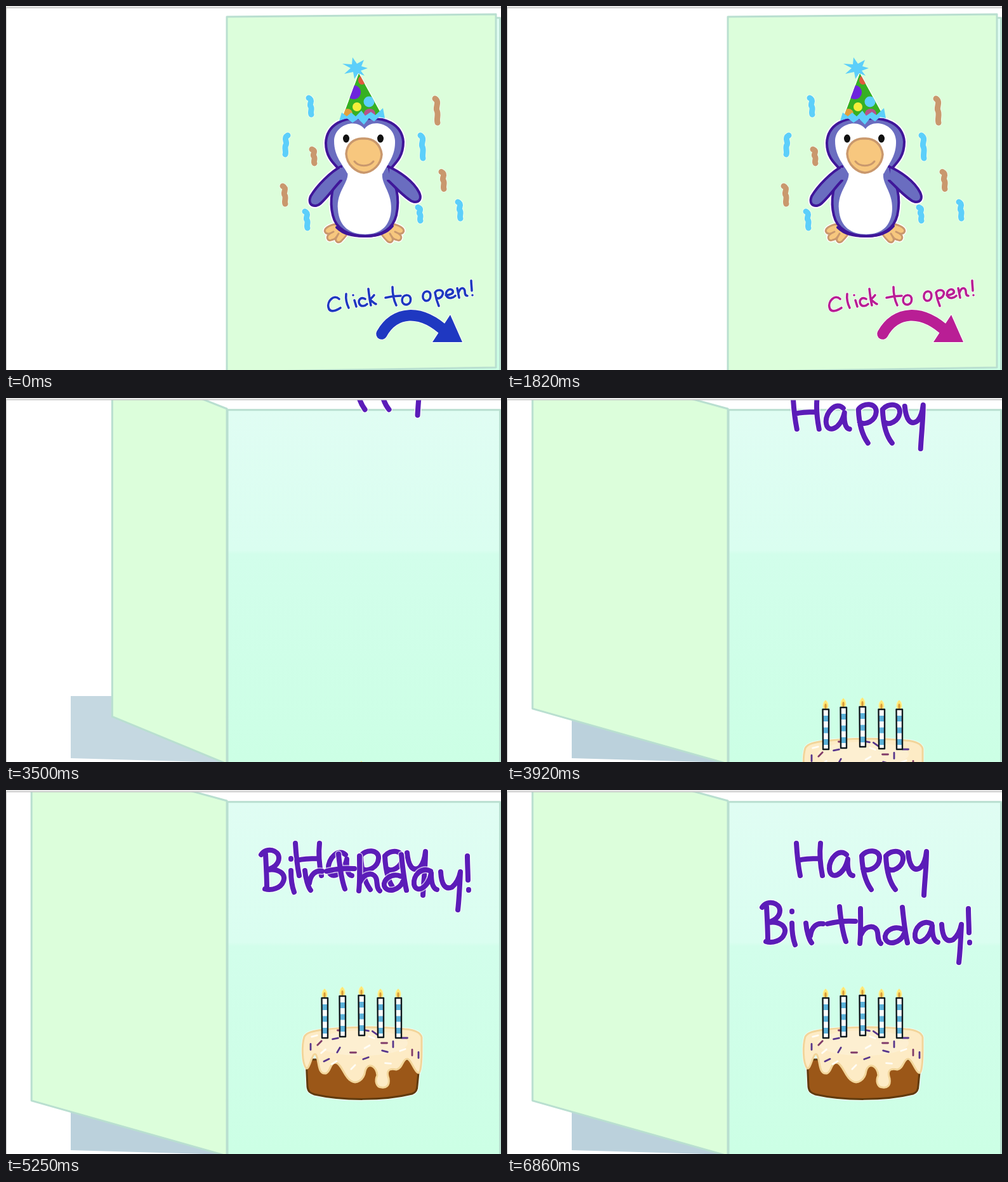
An HTML page with a canvas that plays this animation: 780x574 px, repeating every 6.93 s.

```html
<!DOCTYPE html>
<html lang="en">
<head>
<meta charset="utf-8">
<title>Birthday card</title>
<style>
html, body { margin: 0; width: 780px; height: 574px; overflow: hidden; background: #fff; }
canvas { display: block; }
</style>
</head>
<body>
<canvas id="stage" width="780" height="574" role="img" aria-label="Click to open! Happy Birthday!"></canvas>
<script>
const ctx = document.getElementById('stage').getContext('2d');
const LOOP = 6930, STEP = 70, HINGE = 348;
const SKY = '#5ccffa', TAN = '#c9986d', EDGE = '#b9dfd0', INK = '#3f1699', FUR = '#6a6dc0';
ctx.lineCap = ctx.lineJoin = 'round';

const clamp = v => Math.max(0, Math.min(1, v));
const part = (t, from, to) => clamp((t - from) / (to - from));
const smooth = p => p * p * (3 - 2 * p);

function shape(d, fill, stroke, width = 3) {
  const path = new Path2D(d);
  if (fill) { ctx.fillStyle = fill; ctx.fill(path); }
  if (stroke) { ctx.strokeStyle = stroke; ctx.lineWidth = width; ctx.stroke(path); }
}
function oval(x, y, rx, ry, fill) {
  ctx.beginPath();
  ctx.ellipse(x, y, rx, ry, 0, 0, 7);
  ctx.fillStyle = fill;
  ctx.fill();
}
function polygon(points, fill, stroke, width = 3) {
  shape('M' + points.join('L') + 'Z', fill, stroke, width);
}
function at(x, y, draw) {
  ctx.save();
  ctx.translate(x, y);
  draw();
  ctx.restore();
}

// Hand lettering, one path per letter
const PROMPT = [
  'M525 462C516 454 506 466 508 475C510 485 521 480 527 476',
  'M536 454C535 462 537 470 540 476', 'M549 464L552 474M547 456L547 456',
  'M566 462C559 458 554 464 557 470C560 475 566 473 569 470',
  'M571 446C572 455 573 464 575 472M580 456C577 460 574 462 573 463C577 465 580 469 583 470',
  'M609 443C609 454 611 464 615 472M598 460C606 458 614 457 622 457',
  'M631 456C622 457 622 470 630 471C640 471 640 455 631 456',
  'M663 450C655 451 655 464 662 465C671 465 671 449 663 450',
  'M682 473C679 466 677 458 676 452C680 445 691 448 688 455C686 461 681 462 678 460',
  'M693 456C700 456 706 453 704 449C700 443 691 450 694 457C697 463 705 460 708 457',
  'M711 445C712 450 713 455 714 460M713 452C717 441 723 445 723 450C723 454 724 457 727 457',
  'M733 433C733 439 734 445 734 449M735 456L735 456'
].join('');
const HAPPY = [
  'M456 84C457 102 459 120 462 135M459 111C470 108 482 108 493 108M494 84C492 102 494 120 497 135',
  'M535 102C524 91 507 108 508 124C509 143 531 136 537 109C536 122 538 134 545 135',
  'M574 157C566 146 560 128 559 104C566 93 588 93 587 108C586 122 570 130 561 124',
  'M612 157C603 146 598 128 597 104C606 93 626 94 624 110C622 122 608 130 600 124',
  'M632 99C634 120 641 130 652 122C658 116 660 106 661 97C661 120 658 145 657 166'
].join('');
const BIRTHDAY = [
  'M409 184C410 204 411 222 411 238M402 185C411 172 430 178 430 190C430 203 416 207 412 209C430 206 442 216 437 227C433 238 418 242 408 239',
  'M449 210C449 222 451 236 454 244M449 191L449 192',
  'M471 210C472 222 476 236 480 241M478 230C480 216 488 209 498 211',
  'M524 184C526 205 529 225 534 239M505 211C520 207 535 206 549 207',
  'M557 187C557 205 558 225 556 242M558 228C565 212 582 212 584 225C585 234 585 239 589 242',
  'M622 219C608 213 594 224 596 234C600 246 620 242 626 226M623 185C625 205 628 228 631 241',
  'M669 211C655 203 641 218 643 232C646 246 665 239 670 214C670 228 672 238 679 240',
  'M685 212C686 232 692 241 703 236C710 230 714 222 716 212C715 235 714 255 712 272',
  'M727 187C727 200 728 214 728 225M729 240L729 241'
].join('');

function lettering(d, dx, dy) {
  at(dx, dy, () => {
    shape(d, null, '#ffffffb0', 11);
    shape(d, null, '#5b1cb8', 8);
  });
}

function squiggle(x, y, h, color, flip = 1) {
  at(x, y, () => {
    ctx.scale(flip, 1);
    const q = h / 2;
    const d = `M-3 ${-q}C5 ${-q * .7} -3 ${-q * .3} 0 0S-1 ${q * .7} 1 ${q}`;
    shape(d, null, '#eeffeb', 11);
    shape(d, null, color, 9);
  });
}

const FOOT = 'M12 -11C4 -16 -8 -14 -15 -9C-22 -4 -18 2 -11 1C-18 6 -14 14 -8 11C-4 10 -1 8 0 6C-4 13 2 17 7 13C12 8 17 2 18 -2Z';
const WING = 'M528 253C512 261 490 283 480 300C474 315 488 319 496 311C508 300 518 285 528 275Z';
const WING2 = 'M602 253C620 261 642 276 651 294C658 309 644 313 635 305C622 296 612 284 602 275Z';
const BODY = 'M530 260C512 278 510 310 515 330C520 352 540 363 566 363C594 363 610 350 615 330C621 303 615 275 600 260Z';
const HEAD = 'M565 178C533 173 505 187 504 216C504 241 519 250 528 261L602 261C612 249 626 240 626 214C624 186 596 174 565 178Z';
const BELLY = 'M538 261C542 278 520 292 523 321C525 348 542 360 566 360C592 360 606 345 607 320C608 292 588 278 594 261Z';
const FACE = 'M565 194C552 176 517 187 517 213C517 238 531 250 538 264L594 264C602 248 614 236 613 212C611 185 576 177 565 194Z';

function penguin() {
  for (const d of [WING, WING2, BODY, HEAD]) shape(d, '#fff', '#fff', 8);
  for (const side of [1, -1]) at(side > 0 ? 521 : 608, 358, () => {
    ctx.scale(side, 1);
    shape(FOOT, '#fff', '#fff', 6);
    shape(FOOT, '#f7c77e', TAN, 3);
    shape('M-11 1L-5 -2M0 6L3 1', null, TAN, 3);
  });
  for (const d of [BODY, HEAD, WING, WING2]) shape(d, FUR, INK, 4);
  shape('M526 255L602 255L606 274L526 274Z', FUR);
  shape(BELLY, '#fff');
  shape(FACE, '#fff');
  shape('M521 349C532 360 546 363 566 363C586 363 600 358 609 347', null, INK, 4);
  oval(536, 209, 5, 6.5, '#111');
  oval(590, 209, 5, 6.5, '#111');
  shape('M563 209C548 208 537 218 536 233C537 251 552 262 564 263C578 262 591 250 592 234C590 218 579 208 563 209Z', '#f7c77e', TAN, 3.5);
  shape('M549 245C556 254 572 254 579 245', null, TAN, 3);
}

function hat() {
  const cone = 'M556 106L530 176L594 175Z';
  shape(cone, '#f3fff0', '#f3fff0', 3);
  ctx.save();
  ctx.clip(new Path2D(cone));
  shape(cone, '#36b023');
  oval(548, 136, 11, 11, '#6d24dd');
  oval(572, 151, 8.5, 8.5, SKY);
  oval(553, 159, 7, 7, '#f5ee3a');
  oval(538, 170, 8, 8, '#e2a03c');
  oval(573, 170, 9, 8, '#b6528c');
  oval(561, 117, 6, 7, '#e25a3e');
  ctx.restore();
  const brim = [[525, 181], [529, 168], [537, 174], [544, 168], [551, 174], [560, 165], [566, 173], [575, 167],
    [582, 172], [594, 161], [597, 177], [588, 175], [580, 182], [572, 177], [564, 187], [555, 178], [546, 184], [537, 177]];
  polygon(brim, SKY);
  const star = [[530, 91], [545, 92], [546, 81], [553, 91], [564, 85], [560, 95], [570, 98],
    [559, 102], [565, 110], [555, 106], [549, 115], [547, 104], [533, 107], [543, 98]];
  polygon(star, SKY);
}

function promptColor(t) {
  const hue = t < 1820 ? 231 + 83 * t / 1820 : 314 + 90 * (t - 1820) / 1050;
  return `hsl(${hue % 360} 72% ${44 - 2 * Math.sin(Math.PI * clamp(t / 2870))}%)`;
}

function coverArt(t) {
  squiggle(480, 158, 26, SKY);
  squiggle(441, 219, 30, SKY, -1);
  squiggle(474, 337, 26, SKY);
  squiggle(656, 222, 36, SKY);
  squiggle(652, 328, 21, SKY);
  squiggle(715, 322, 26, SKY);
  squiggle(679, 165, 38, TAN);
  squiggle(485, 237, 22, TAN);
  squiggle(439, 298, 28, TAN);
  squiggle(689, 275, 27, TAN);
  penguin();
  hat();
  const color = promptColor(t);
  const arrow = 'M592 517C612 481 653 476 694 515';
  const head = [[700, 487], [719, 530], [672, 530]];
  shape(PROMPT, null, '#f4fff2', 6);
  shape(arrow, null, '#f4fff2', 20);
  polygon(head, null, '#f4fff2', 3);
  shape(PROMPT, null, color, 3.6);
  shape(arrow, null, color, 17.5);
  polygon(head, color);
}

function cover(t, open) {
  const s = Math.cos(open * Math.acos(-.726)), k = -.189 * open;
  const turn = ([x, y]) => [HINGE + (x - HINGE) * s, y + k * (x - HINGE)];
  polygon([[HINGE, 17], [772, 13], [772, 570], [HINGE, 577]].map(turn), '#dcfedb', EDGE, 3);
  if (s <= 0) return;
  ctx.save();
  ctx.transform(s, k, 0, 1, HINGE * (1 - s), -k * HINGE);
  coverArt(t);
  ctx.restore();
}

function page() {
  const g = ctx.createLinearGradient(0, 18, 0, 574);
  g.addColorStop(0, '#e0fdf3');
  g.addColorStop(.4, '#dafef0');
  g.addColorStop(.41, '#d2feeb');
  g.addColorStop(1, '#ccffe5');
  polygon([[349, 18.7], [778.5, 18.7], [778.5, 590], [349, 590]], g, EDGE, 3);
}

function candle(x, top, bottom) {
  oval(x, top - 5, 4.5, 8, '#fff3a0');
  shape(`M${x} ${top - 14}C${x + 7} ${top - 3} ${x + 3} ${top} ${x} ${top}S${x - 7} ${top - 3} ${x} ${top - 14}Z`, '#fbe675');
  oval(x, top - 4, 1.6, 4, '#d89a3a');
  ctx.fillStyle = '#fff';
  ctx.fillRect(x - 4.5, top + 1, 9, bottom - top - 1);
  ctx.fillStyle = '#5cb2da';
  for (let y = top + 11; y < bottom - 5; y += 18.5) ctx.fillRect(x - 4.5, y, 9, 9);
  shape(`M${x - 4.5} ${top + 1}H${x + 5}V${bottom}H${x - 4}Z`, null, '#10191d', 2.4);
}

const SPRINKLES = [
  [480, 405, 90], [494, 399, -45], [505, 426, -25], [524, 410, -60], [547, 414, 0], [567, 423, -20],
  [597, 412, 15], [596, 399, 0], [610, 401, 90], [519, 392, -10], [527, 379, 0], [581, 383, 35],
  [628, 391, 0], [640, 414, 90], [650, 418, 90], [567, 379, 10]
];
const WHITES = [[486, 388, -15], [500, 412, -40], [547, 437, -45], [517, 430, -30], [576, 390, 20], [625, 410, -20], [602, 431, 5], [569, 405, -30]];

function sprinkle([x, y, deg], color) {
  const a = deg * Math.PI / 180, dx = 4.5 * Math.cos(a), dy = 4.5 * Math.sin(a);
  shape(`M${x - dx} ${y - dy}L${x + dx} ${y + dy}`, null, color, 2.8);
}

function cake(dy) {
  const base = 'M473 425L475 468C476 476 480 478 486 480C530 490 595 490 640 479C646 477 648 473 648 466L652 425Z';
  const icing = 'M470 389C474 382 484 380 500 378C540 373 590 373 628 377C643 378 653 382 655 390L655 412C655 425 654 449 649 446C643 443 638 424 632 424C625 424 625 439 615 441C600 438 600 446 603 455C605 467 598 470 592 469C583 469 581 458 585 450C584 435 570 428 566 443C564 458 552 464 544 459C533 454 530 433 520 430C510 430 512 444 504 447C490 449 494 425 488 417C482 413 479 441 473 439C466 430 466 402 470 389Z';
  at(0, dy, () => {
    shape(base, null, '#ffffff90', 6);
    shape(icing, null, '#ffffff90', 5);
    shape(base, '#9b5718', '#613a0d', 3);
    shape(icing, '#fdebc5', '#f2d59a', 3);
    ctx.save();
    ctx.clip(new Path2D(icing));
    oval(561, 399, 72, 20, '#fef4db88');
    ctx.restore();
    WHITES.forEach(w => sprinkle(w, '#fffdf6'));
    SPRINKLES.forEach((p, i) => sprinkle(p, i % 3 === 1 ? '#803b68' : '#57358c'));
    candle(502, 327, 391);
    candle(530, 324, 389);
    candle(560, 323, 387);
    candle(590, 327, 390);
    candle(618, 327, 391);
  });
}

function chrome() {
  ctx.fillStyle = '#ececec';
  ctx.fillRect(0, 0, 780, 3);
  ctx.fillStyle = '#c6c6c6';
  ctx.fillRect(0, 2, 780, 1.5);
  ctx.fillRect(0, 3, 1, 571);
}

function draw(t) {
  const open = smooth(part(t, 3080, 3640));
  ctx.fillStyle = '#fff';
  ctx.fillRect(0, 0, 780, 574);
  page();
  if (open > 0) {
    const rise = 1 - part(t, 3300, 4603);
    ctx.save();
    ctx.beginPath();
    ctx.rect(350, 3, 427, 571);
    ctx.clip();
    lettering(HAPPY, -10 * rise, -164 * rise);
    if (t > 4560) lettering(BIRTHDAY, 0, -286 * (1 - part(t, 4560, 5532)));
    cake(311 * rise);
    ctx.restore();
    ctx.globalAlpha = open;
    polygon([[102, 470], [348, 470], [348, 575], [102, 568]], '#bbd1dc');
    ctx.globalAlpha = 1;
  }
  cover(t, open);
  chrome();
}

const start = performance.now();
function tick() {
  const t = (performance.now() - start) % LOOP;
  draw(Math.floor(t / STEP) * STEP);
  requestAnimationFrame(tick);
}
tick();
</script>
</body>
</html>
```
